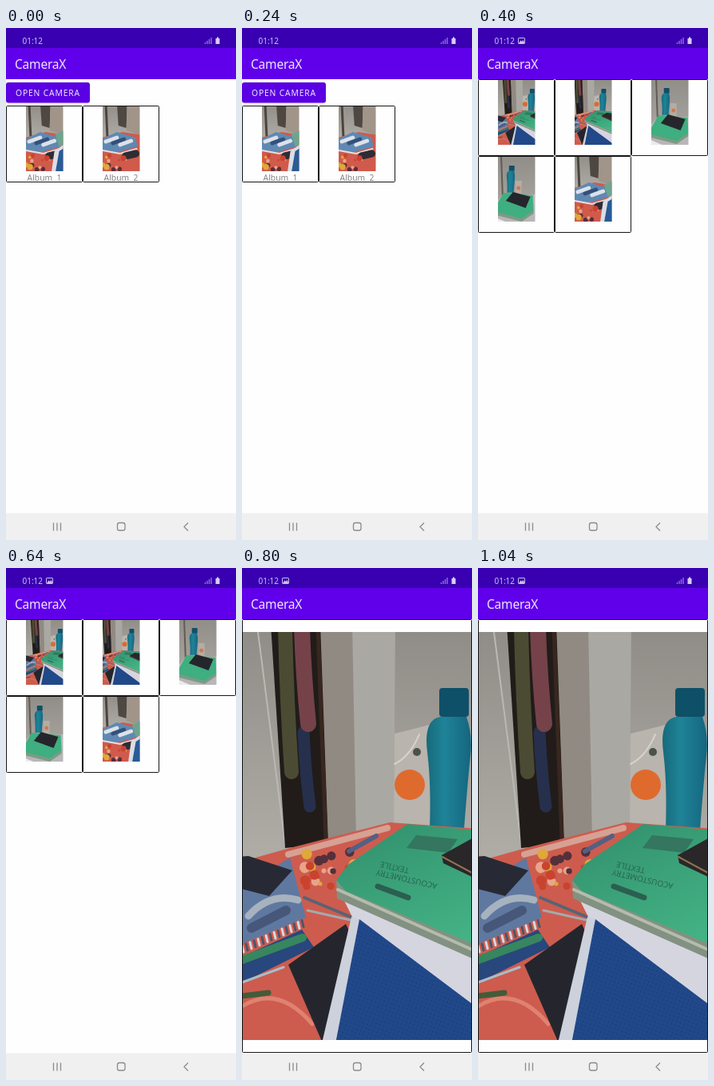
These frames come from a looping animation (288 by 640 pixels, 1.2 s). An HTML page:

```html
<!DOCTYPE html>
<html lang="en">
<head>
<meta charset="utf-8">
<title>Camera album</title>
<style>
  html, body { margin: 0; width: 100%; height: 100%; overflow: hidden; background: #fefefe; }
  svg { display: block; }
  #stage { width: 100vw; height: 100vh; }
  text { font-family: "Noto Sans", "Open Sans", sans-serif; }
</style>
</head>
<body>
<svg id="stage" viewBox="0 0 288 640">
  <defs>
    <linearGradient id="wall" x2="0" y2="1">
      <stop offset="0" stop-color="#8f8c87"/><stop offset="1" stop-color="#b3afa9"/>
    </linearGradient>
    <linearGradient id="teal">
      <stop offset="0" stop-color="#176a7b"/><stop offset=".4" stop-color="#1f8398"/><stop offset="1" stop-color="#146680"/>
    </linearGradient>
    <linearGradient id="cover" x2=".6" y2="1">
      <stop offset="0" stop-color="#318f6c"/><stop offset="1" stop-color="#46b788"/>
    </linearGradient>
    <pattern id="weave" width="5" height="5" patternUnits="userSpaceOnUse" patternTransform="rotate(20)">
      <path d="M0 0h5v5H0z" fill="#21498a"/><circle cx="2.500" cy="2.500" r="1" fill="#1b3c78"/>
    </pattern>
    <filter id="soft"><feGaussianBlur stdDeviation=".6"/></filter>
    <g id="bottle">
      <path d="M248 186H281Q289 208 286 235T278 327H235Q237 270 232 230T248 186z" fill="url(#teal)"/>
      <rect x="247" y="150" width="37" height="36" rx="4" fill="#0e5068"/>
    </g>
    <g id="desk" filter="url(#soft)"></g>
    <g id="close" filter="url(#soft)"></g>
    <g id="mess" filter="url(#soft)"></g>
  </defs>
  <rect width="288" height="640" fill="#fefefe"/>
  <rect width="288" height="25" fill="#3900b1"/>
  <rect y="25" width="288" height="39" fill="#6000ea"/>
  <text x="20.500" y="20" font-size="10" fill="#cdbdec">01:12</text>
  <text x="11" y="50.500" font-size="15.500" letter-spacing="-.2" fill="#efe5ff">CameraX</text>
  <g id="notice">
    <rect x="50.500" y="12.500" width="8" height="7" rx=".6" fill="none" stroke="#cdbdec"/>
    <path d="M51 19l2.500-3.500 1.500 1.500 1.500-2 2 4z" fill="#cdbdec"/>
  </g>
  <path id="signal" stroke="#8f70d4" stroke-width="1.400"/>
  <path d="M262.500 13h1.500v-1.500h2V13h1.500v7h-5z" fill="#d9cdf2"/>
  <g id="albums"></g>
  <g id="grid"></g>
  <g id="viewer"></g>
  <rect y="606.500" width="288" height="33.500" fill="#f0f0f0"/>
  <g fill="none" stroke="#8b8b8b" stroke-width="1.300">
    <path d="M59.500 618.500v10M64 618.500v10M68.500 618.500v10M228 618.500l-5 5 5 5"/>
    <rect x="139.500" y="618.500" width="9.500" height="9.500" rx="2.600"/>
  </g>
</svg>
<script>
const $ = id => document.getElementById(id);
const poly = (points, fill) => `<polygon points="${points}" fill="${fill}"/>`;
const box = (x, y, w, h, fill, rx = 0) =>
  `<rect x="${x}" y="${y}" width="${w}" height="${h}" rx="${rx}" fill="${fill}"/>`;
const dot = (x, y, r, fill) => `<circle cx="${x}" cy="${y}" r="${r}" fill="${fill}"/>`;
const line = (d, color, width) =>
  `<path d="${d}" fill="none" stroke="${color}" stroke-width="${width}" stroke-linecap="round"/>`;
const text = (x, y, size, words, attrs = '') =>
  `<text x="${x}" y="${y}" font-size="${size}" ${attrs}>${words}</text>`;
const repeat = (n, part) => Array.from({ length: n }, (_, i) => part(i)).join('');

function random(seed) {
  return () => (seed = seed * 16807 % 2147483647) / 2147483647;
}

// Scatters petals over a patch of the tablecloth.
function petals(n, x, y, w, h, r, seed) {
  const next = random(seed);
  const colors = ['#e0a838', '#c9432f', '#e9a48b', '#54303a'];
  return repeat(n, i => dot(x + w * next(), y + h * next(), r * (.5 + next()), colors[i % 4]));
}

const garment = (x, top, bottom, width, color) =>
  line(`M${x} ${top}Q${x + 2} ${(top + bottom) / 2} ${x + 8} ${bottom}`, color, width);

function drawDesk() {
  const wardrobe = poly('36,70 98,70 108,345 54,350', '#211c19') +
    garment(54, 75, 255, 18, '#4b4b33') + garment(77, 205, 298, 15, '#26304d') +
    garment(75, 75, 195, 20, '#75424a') + line('M95 75L105 340', '#38271f', 5);
  const walls = box(-5, 70, 360, 320, 'url(#wall)') + line('M20 80L54 345', '#bab8b2', 2) +
    poly('97,70 140,70 143,335 108,342', '#918a83') +
    poly('138,70 192,70 190,325 143,335', '#aaa8a2');
  const bag = poly('191,207 239,195 241,325 190,323', '#b9b4ad') +
    line('M191 245Q210 236 222 208', '#d5d2cc', 2) + dot(219, 230, 5, '#4c514a') +
    dot(210, 271, 19, '#df6a2e');
  const cloth = poly('-5,368 60,350 185,318 355,330 355,600 -5,600', '#cd5c4e') +
    line('M58 358L182 325', '#d6a193', 8) + petals(28, 78, 355, 65, 50, 5, 11) +
    line('M0 548Q45 520 88 570', '#df8271', 5) + line('M0 535L33 531', '#445b39', 7);
  const stack = poly('-5,488 75,452 90,474 -5,521', '#28477c') +
    line('M0 490L76 462', '#37865f', 10) +
    poly('-5,402 60,362 80,437 -5,472', '#5f78a0') +
    line('M8 435Q35 405 70 415', '#a7b2bf', 9) + line('M12 450L55 428', '#465779', 12) +
    repeat(16, i => line(`M${i * 5} ${472 - i * 2.1}l2 8`, i % 2 ? '#4a556e' : '#d5d8df', 3)) +
    poly('-5,361 8,360 63,378 34,410 -5,400', '#272a35');
  const pens = line('M0 518L52 499', '#a9bdc9', 3) + line('M78 412L136 436', '#596374', 4) +
    line('M82 428L140 441', '#a4a9af', 3) + line('M134 354L168 335', '#536084', 6);
  const papers = poly('58,496 130,445 137,460 101,594', '#25262d') +
    poly('126,412 355,515 355,600 288,546 140,440', '#d5d5e0') +
    poly('137,436 148,439 119,594 100,594', '#cdd1dc') +
    poly('147,439 355,595 355,600 116,600', 'url(#weave)');
  const book = poly('118,391 355,470 355,518 288,488 119,413', '#829181') +
    line('M120 402L288 477L355 505', '#b5bcad', 4) +
    poly('118,390 134,370 207,320 355,333 355,500 288,469 130,404', 'url(#cover)') +
    poly('218,334 270,339 258,356 206,350', '#34765f') +
    line('M170 398L208 412', '#2b5f50', 7) +
    `<g transform="translate(205 376) rotate(193)" fill="#28664f" text-anchor="middle">
      ${text(14, 2, 10, 'TEXTILE')}${text(-4, -9, 10, 'ACOUSTOMETRY')}
    </g>`;
  const phone = poly('250,359 288,338 355,345 355,418 288,386 252,369', '#29272a') +
    line('M251 361L288 381L340 404', '#94724f', 2);
  return walls + wardrobe + bag + '<use href="#bottle"/>' + cloth + stack + pens + papers + book + phone;
}

const drawClose = () =>
  box(-5, -5, 60, 95, 'url(#wall)') + line('M6 -5L8 50', '#625a53', 2) +
  box(24, 29, 8, 17, '#b5aca5') + dot(28, 38, 2.500, '#cf784c') +
  '<use href="#bottle" transform="translate(-31 -18.500) scale(.19)"/>' +
  poly('-5,62 8,46 52,46 52,90 -5,90', '#b8b6b8') +
  poly('0,66 32,75 47,65 47,70 32,80 0,72', '#7f9a84') +
  poly('0,60 9,44 46,47 47,66 32,76 0,68', '#3fae80') +
  poly('12,54 21,43 43,49 37,63', '#24262b') +
  line('M-2 77L12 83', '#ebe9ee', 5);

const drawMess = () =>
  box(-5, -5, 60, 50, 'url(#wall)') + line('M4 -5L6 38', '#4c443d', 3) +
  poly('18,-5 31,-5 30,27 20,24', '#4f4842') + poly('31,-5 52,-5 52,38 30,30', '#a1958a') +
  poly('-5,40 25,32 52,36 52,90 -5,90', '#d05a4c') +
  poly('-3,42 18,32 42,39 44,50 20,57 -3,54', '#5f89b3') +
  repeat(3, i => line(`M${4 + i * 9} ${44 + i * 2}l14 -5`, i % 2 ? '#34517c' : '#dce2e7', 5)) +
  line('M0 55L22 59L43 53', '#dfe2e5', 2) +
  line('M29 62L42 59', '#302c33', 9) + petals(14, 0, 60, 32, 20, 2.500, 5);

$('desk').innerHTML = drawDesk();
$('close').innerHTML = drawClose();
$('mess').innerHTML = drawMess();

const photo = (id, x, y, w, h, view, extra = '') =>
  `<svg x="${x}" y="${y}" width="${w}" height="${h}" viewBox="${view}" preserveAspectRatio="none">
    <use href="#${id}"/>${extra}</svg>`;
const frame = (x, y, w, h) =>
  `<rect x="${x + .5}" y="${y + .5}" width="${w - 1}" height="${h - 1}" rx="1" fill="none" stroke="#161616"/>`;

// Places item i in a three-column grid of square cells.
function cell(i, top, id, view, { caption = '', extra } = {}) {
  const x = i % 3 * 96, y = top + Math.floor(i / 3) * 96;
  return photo(id, x + 25, y + 1, 46.500, 81, view, extra) + frame(x, y, 96, 96) +
    text(x + 48, y + 93.500, 10.300, caption, 'text-anchor="middle" fill="#858585" xml:space="preserve"');
}

const full = '0 80 288 510', small = '0 0 47 81';
const notebook = poly('36,56 50,46 50,84 32,84', '#dcdde5') + poly('42,56 50,51 50,84 37,84', '#295b96') +
  poly('37,35 50,29 50,47 42,50', '#6ca48f');
$('signal').setAttribute('d', repeat(4, i => `M${249.500 + i * 2.500} 20v${-2 - i * 2}`));
$('albums').innerHTML =
  box(0, 68.500, 105, 26, '#e4e1ea', 3) + box(0, 68, 105, 25.500, '#5a00e2', 3) +
  text(12, 84.500, 10.300, 'OPEN CAMERA', 'fill="#efe5ff" letter-spacing=".85"') +
  cell(0, 97, 'mess', small, { caption: 'Album  1', extra: notebook }) +
  cell(1, 97, 'mess', small, { caption: 'Album  2' });
$('grid').innerHTML =
  cell(0, 64, 'desk', full) + cell(1, 64, 'desk', '40 80 288 510') + cell(2, 64, 'close', small) +
  cell(3, 64, 'close', '2 -1 47 81') + cell(4, 64, 'mess', small, { extra: notebook });
$('viewer').innerHTML = photo('desk', 0, 80, 288, 510, full) + frame(0, 64, 288, 542);

const screens = ['albums', 'grid', 'viewer'];
const show = (id, on) => $(id).setAttribute('display', on ? 'inline' : 'none');

function draw(ms) {
  const current = Math.floor(ms % 1200 / 400);
  screens.forEach((id, i) => show(id, i === current));
  show('notice', current > 0);
}

const start = performance.now();
function tick() {
  draw(performance.now() - start);
  requestAnimationFrame(tick);
}
tick();
</script>
</body>
</html>
```
